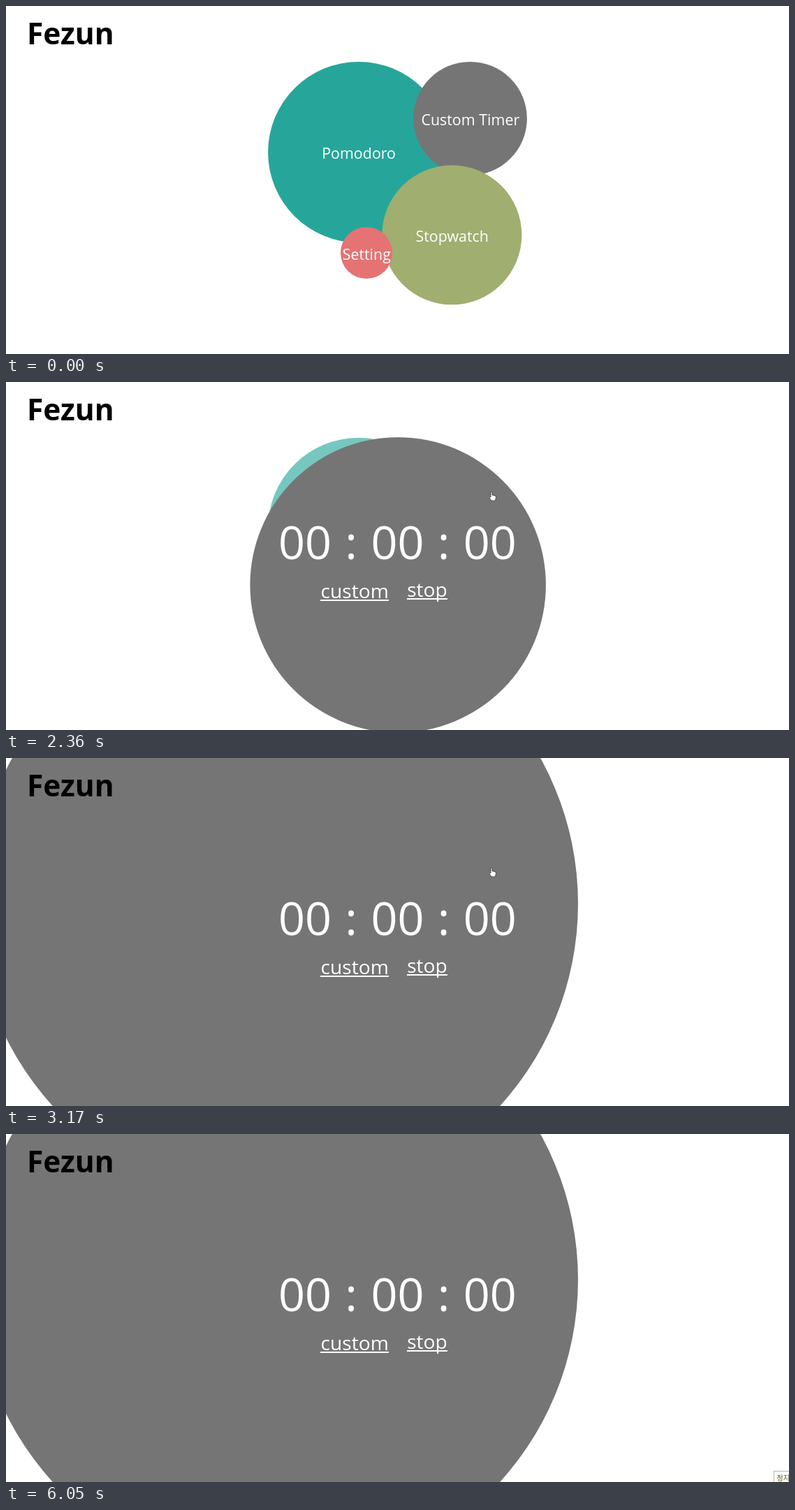
Recreate the animation shown at these times as an HTML page with a canvas. Size 1121 by 499 pixels, loop 6.13 s.

```html
<!DOCTYPE html>
<html lang="en">
<head>
<meta charset="utf-8">
<title>Timer bubbles</title>
<style>
html, body { margin: 0; width: 100%; height: 100%; overflow: hidden; background: #fff; }
canvas { display: block; }
</style>
</head>
<body>
<canvas id="stage" width="1121" height="499"></canvas>
<script>
const ctx = document.getElementById('stage').getContext('2d');
const LOOP = 6130, CLICK = 2030, JUMP = 2095, DIGITS = 2290;
const GREY = '#757575';
const sans = '"Open Sans", "Noto Sans", sans-serif';

const bubbles = {
  pomodoro: { x: 504.8, y: 209.7, r: 129.7, fill: '#26a69a', label: 'Pomodoro', base: 219 },
  custom: { x: 664.5, y: 161.3, r: 81.4, fill: GREY, label: 'Custom Timer', base: 171 },
  stopwatch: { x: 638.4, y: 328.3, r: 100, fill: '#a0ae70', label: 'Stopwatch', base: 338 },
  setting: { x: 516, y: 354, r: 37, fill: '#e57373', label: 'Setting', base: 364 }
};

// Pointer route: time, x, y
const route = [
  [530, 1078, 486], [800, 860, 290], [1080, 741, 155], [1215, 741, 155],
  [1410, 722, 148], [1610, 695, 157], [3765, 695, 157], [3965, 790, 258], [4170, 998, 474]
];
const arrow = new Path2D('M0 0V10.3L2.3 8.3L4 12L5.5 11.3L4 7.7H7Z');
const hand = new Path2D('M-1 1Q0 -.8 1 1V5L5 6Q6.6 6.4 6.5 8L5.6 13.2H-.2L-3 8.7Q-3.4 7 -1 8Z');

const mix = (a, b, p) => a + (b - a) * p;

// cubic-bezier(.25, .1, .25, 1)
function ease(x) {
  if (x <= 0) return 0;
  if (x >= 1) return 1;
  let low = 0, high = 1, u;
  for (let i = 0; i < 24; i++) {
    u = (low + high) / 2;
    if (.75 * u * (1 - u) + u ** 3 < x) low = u; else high = u;
  }
  return .3 * u * (1 - u) ** 2 + 3 * u * u * (1 - u) + u ** 3;
}

function disc({ x, y, r, fill }) {
  ctx.fillStyle = fill;
  ctx.beginPath();
  ctx.arc(x, y, r, 0, 2 * Math.PI);
  ctx.fill();
}

function write(text, x, y, size, color = '#fff', weight = 400, align = 'center') {
  ctx.font = `${weight} ${size}px ${sans}`;
  ctx.textAlign = align;
  ctx.fillStyle = color;
  ctx.fillText(text, x, y);
}

function bubble(b, labelled = true) {
  disc(b);
  if (labelled) write(b.label, b.x + .3, b.base, 21.4);
}

function timerPage() {
  ['00', ':', '00', ':', '00'].forEach((s, i) => write(s, 428 + 66.2 * i, 254, 66.5));
  write('custom', 499.3, 310, 28.2);
  ctx.fillRect(450, 312, 98, 2);
  write('stop', 603, 308, 28.2);
  ctx.fillRect(574, 310, 58, 2);
}

function pointer(t, target) {
  if (t < 530 || t >= 4240) return;
  const next = route.findIndex(k => k[0] > t);
  const [t1, x1, y1] = route.at(next);
  const [t0, x0, y0] = next < 0 ? route.at(-1) : route[next - 1];
  const p = t1 > t0 ? (t - t0) / (t1 - t0) : 1;
  const x = mix(x0, x1, p), y = mix(y0, y1, p);
  const inside = Math.hypot(x - target.x, y - target.y) < target.r;
  ctx.save();
  ctx.translate(x, y);
  ctx.fillStyle = '#fff';
  ctx.strokeStyle = '#333';
  ctx.lineWidth = .8;
  const shape = inside ? hand : arrow;
  ctx.fill(shape);
  ctx.stroke(shape);
  ctx.restore();
}

function tooltip(t) {
  if (t < 5630) return;
  ctx.globalAlpha = t < 5710 ? .5 : 1;
  ctx.fillStyle = '#fff';
  ctx.fillRect(1099, 483, 30, 20);
  ctx.strokeStyle = '#b5b5b5';
  ctx.lineWidth = 1;
  ctx.strokeRect(1099.5, 483.5, 30, 20);
  if (t >= 6050) disc({ x: 1108.5, y: 500.5, r: 11.5, fill: 'rgba(255, 240, 60, .15)' });
  ctx.font = '10px "Noto Sans CJK KR", "Noto Sans CJK", sans-serif';
  ctx.textAlign = 'left';
  ctx.fillStyle = '#555';
  ctx.fillText('정지', 1103.5, 496.5);
  ctx.globalAlpha = 1;
}

function draw(t) {
  // The expanding page advances at about 15 pictures per second.
  const stepped = 2024 + Math.floor((t - 2024) / 66.5) * 66.5;
  const p = ease((stepped - 2123) / 1000);
  const jumped = t >= JUMP;
  const { pomodoro, custom, stopwatch, setting } = bubbles;
  const target = jumped
    ? { x: mix(664.2, 387, p), y: mix(339.5, 209, p), r: mix(81.5, 432, p), fill: GREY }
    : custom;

  ctx.fillStyle = '#fff';
  ctx.fillRect(0, 0, 1121, 499);
  ctx.globalAlpha = 1 - p;
  bubble(pomodoro);
  if (!jumped) bubble(custom, t < CLICK);
  bubble(stopwatch);
  bubble(setting);
  ctx.globalAlpha = 1;
  if (jumped) disc(target);
  if (t >= DIGITS) timerPage();
  write('Fezun', 30, 55, 42.5, '#000', 700, 'left');
  pointer(t, target);
  tooltip(t);
}

const start = performance.now();
function frame() {
  draw((performance.now() - start) % LOOP);
  requestAnimationFrame(frame);
}
frame();
</script>
</body>
</html>
```
